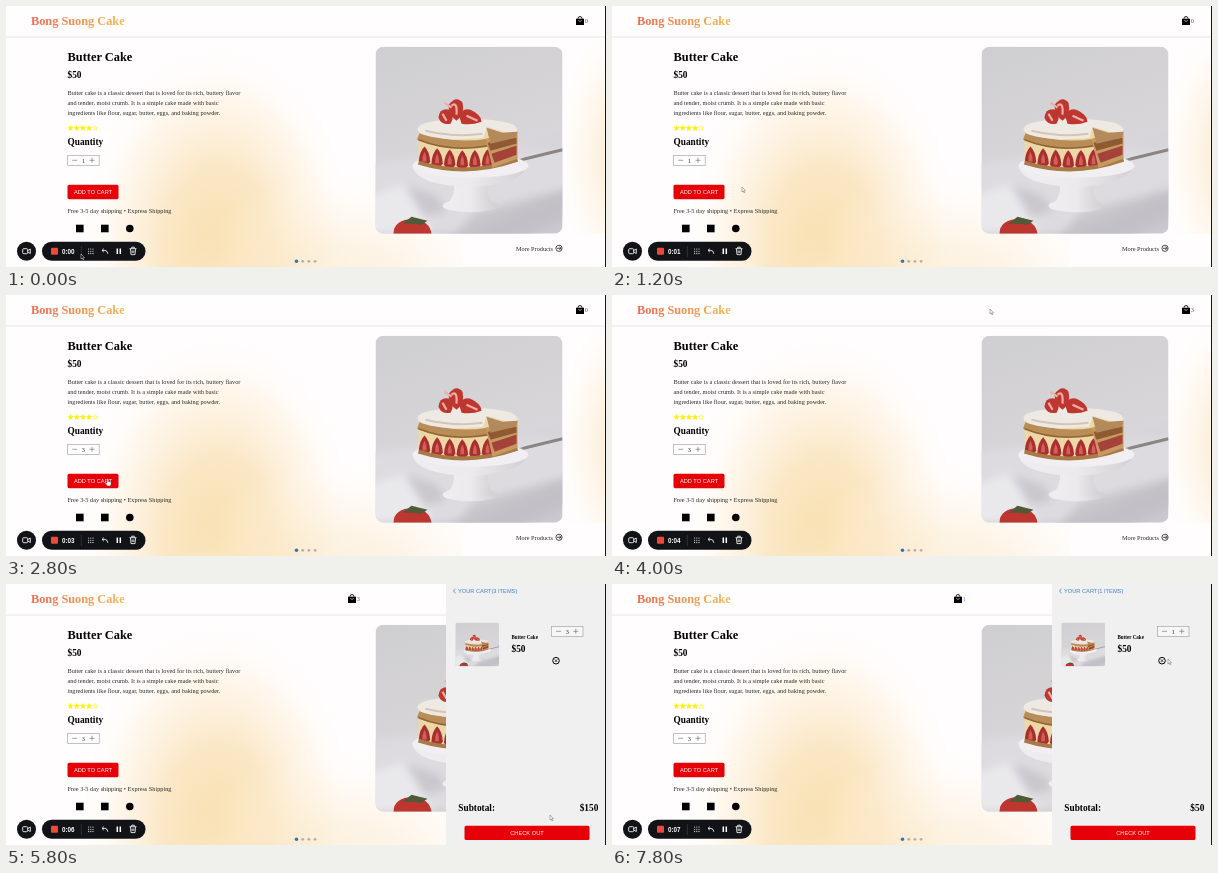
An HTML page that plays this animation: 600x261 px, repeating every 8 s.

```html
<!DOCTYPE html>
<html lang="en">
<head>
<meta charset="utf-8">
<title>Cake shop</title>
<style>
  html, body { margin: 0; width: 100%; height: 100%; overflow: hidden; background: #fffdfd; }
  svg { display: block; width: 100vw; height: 100vh; }
  text { font-family: "Liberation Serif", serif; font-size: 6.25px; fill: #2a2a2a; }
  .bold { font-weight: bold; fill: #000; }
  .title { font-size: 12.4px; }
  .sub { font-size: 9.3px; }
  .sans { font-family: "Liberation Sans", sans-serif; font-size: 5.7px; }
  .white { fill: #fff; }
  .line { fill: none; stroke: #222; stroke-width: .8; }
  .pale { fill: none; stroke: #f2f2f2; stroke-width: .9; }
</style>
</head>
<body>
<svg viewBox="0 0 600 261" preserveAspectRatio="none">
  <defs>
    <radialGradient id="glow">
      <stop offset="0" stop-color="#f9dfae"/>
      <stop offset=".4" stop-color="#fae5c0" stop-opacity=".9"/>
      <stop offset=".72" stop-color="#fef2df" stop-opacity=".6"/>
      <stop offset="1" stop-color="#fffdfd" stop-opacity="0"/>
    </radialGradient>
    <linearGradient id="brand">
      <stop offset="0" stop-color="#ee6a50"/>
      <stop offset="1" stop-color="#f0bc58"/>
    </linearGradient>
    <linearGradient id="wall" x2=".35" y2="1">
      <stop offset="0" stop-color="#cfced0"/>
      <stop offset=".55" stop-color="#d6d4d6"/>
      <stop offset=".7" stop-color="#d8d6da"/>
      <stop offset="1" stop-color="#cbc9cf"/>
    </linearGradient>
    <linearGradient id="stand">
      <stop offset="0" stop-color="#efedef"/>
      <stop offset=".5" stop-color="#eceaec"/>
      <stop offset="1" stop-color="#d2cfd3"/>
    </linearGradient>
    <clipPath id="frame"><rect width="187" height="187" rx="8"/></clipPath>
    <filter id="soft"><feGaussianBlur stdDeviation="4"/></filter>

    <g id="photo" clip-path="url(#frame)">
      <rect width="187" height="187" fill="url(#wall)"/>
      <g filter="url(#soft)">
        <path d="M-9 118L45 110L196 100V140L90 187H-9Z" fill="#dddbdf"/>
        <path d="M-9 150L34 136L58 187H-9Z" fill="#e9e8eb"/>
        <path d="M100 166L196 140V168L135 196H70Z" fill="#bfbcc3" opacity=".7"/>
        <path d="M28 137L62 150L72 164L48 170Z" fill="#bdbac1" opacity=".6"/>
      </g>
      <path d="M126 120L150 112L187 103" fill="none" stroke="#8b8585" stroke-width="3"/>
      <ellipse cx="95" cy="159" rx="28" ry="6.5" fill="url(#stand)"/>
      <path d="M77 132H114Q108 146 119 159Q95 166 71 159Q82 146 77 132Z" fill="url(#stand)"/>
      <path d="M37 120Q42 139 95 140Q148 138 153 117Z" fill="url(#stand)"/>
      <ellipse cx="95" cy="119" rx="58" ry="12" fill="#f1eff1"/>
      <path d="M43 82V116Q92 132 142 114V82Z" fill="#ecd7a6"/>
      <g id="slices"></g>
      <path d="M43 89Q75 102 113 96" fill="none" stroke="#b98d57" stroke-width="8"/>
      <path d="M43 93Q75 106 112 99" fill="none" stroke="#94652f" stroke-width="1.5"/>
      <path d="M43 116Q92 131 142 113" fill="none" stroke="#a97a48" stroke-width="4"/>
      <path d="M110 92L142 85V112L117 121Z" fill="#c79a62"/>
      <path d="M112 96L141 91V97L115 104Z" fill="#8d5a32"/>
      <path d="M116 107L141 99V108L119 116Z" fill="#a3433a"/>
      <path d="M42 82Q43 73 92 72Q141 73 142 83Q141 89 128 85L111 80L108 91Q70 95 48 88Q42 86 42 82Z" fill="#efe9e4"/>
      <path d="M50 84Q80 91 107 87" fill="none" stroke="#d4c5b8" stroke-width="2"/>
      <path d="M111 81L127 86L142 85L140 91L115 97Z" fill="#b48a5c"/>
      <g fill="#bd3730">
        <path d="M63 71Q64 61 74 63Q80 69 75 77Q66 79 63 71Z"/>
        <path d="M73 58Q81 48 87 56Q90 68 81 74Q73 68 73 58Z"/>
        <path d="M84 70Q86 61 95 63Q106 68 106 75Q96 79 86 77Z"/>
        <path d="M18 187Q18 173 38 172Q54 174 56 187Z"/>
      </g>
      <path d="M76 59Q82 54 81 68M91 69L102 74M67 67L71 74M69 56L76 61" fill="none" stroke="#efafa4" stroke-width="2.2"/>
      <path d="M27 177L36 170L52 174L46 178L37 177Z" fill="#4f5a38"/>
    </g>

    <g id="bag">
      <path d="M-4-2.3H4V4H-4Z"/>
      <path d="M-2-2.3Q-2-4.5 0-4.5T2-2.3" fill="none" stroke="#000" stroke-width=".9"/>
      <path d="M-1.8-.7Q0 1.8 1.8-.7" fill="none" stroke="#fff" stroke-width=".6"/>
    </g>
    <g id="stepper">
      <rect width="31.5" height="10" fill="#fff" fill-opacity=".35" stroke="#999" stroke-width=".6"/>
      <path d="M4.5 4.8H9.5M21.8 4.8H26.8M24.3 2.3V7.3" fill="none" stroke="#666" stroke-width=".6"/>
    </g>
  </defs>

  <rect width="600" height="261" fill="#fffdfd"/>
  <ellipse cx="212" cy="242" rx="140" ry="205" fill="url(#glow)"/>
  <ellipse cx="340" cy="290" rx="165" ry="125" fill="url(#glow)" opacity=".42"/>
  <ellipse cx="622" cy="150" rx="75" ry="140" fill="url(#glow)" opacity=".5"/>
  <rect x="457" y="228" width="143" height="33" fill="#fffdfd"/>
  <rect width="600" height="31" fill="#fffdfd"/>
  <path d="M0 31H600" stroke="#e2e0e0" stroke-width=".8"/>

  <text class="bold" x="25" y="18.7" style="font-size:12.3px;fill:url(#brand)">Bong Suong Cake</text>
  <g id="basket">
    <use href="#bag" x="574" y="15"/>
    <text id="badge" x="578.7" y="16.8"></text>
  </g>

  <text class="bold title" x="61.5" y="55">Butter Cake</text>
  <text class="bold sub" x="61.5" y="71.5">$50</text>
  <text x="61.5" y="89.3">Butter cake is a classic dessert that is loved for its rich, buttery flavor</text>
  <text x="61.5" y="99.3">and tender, moist crumb. It is a simple cake made with basic</text>
  <text x="61.5" y="109.3">ingredients like flour, sugar, butter, eggs, and baking powder.</text>
  <g id="stars" stroke="#fff000" stroke-width=".5"></g>
  <text class="bold sub" x="61.5" y="139">Quantity</text>
  <use href="#stepper" x="61.7" y="149.5"/>
  <text id="quantity" x="77.3" y="157" text-anchor="middle"></text>
  <rect x="61.5" y="178.8" width="51" height="14.4" rx="1.7" fill="#e60008"/>
  <text class="sans white" x="87" y="188" text-anchor="middle">ADD TO CART</text>
  <text x="61.5" y="207">Free 3-5 day shipping • Express Shipping</text>
  <rect x="70" y="218.7" width="7.6" height="7.6"/>
  <rect x="95" y="218.7" width="7.6" height="7.6"/>
  <circle cx="123.8" cy="222.5" r="3.8"/>

  <use href="#photo" x="369.5" y="40.7"/>
  <text x="510" y="244.7">More Products</text>
  <g class="line">
    <circle cx="553" cy="242.3" r="3.1"/>
    <path d="M551 242.3H555M553.4 240.6L555 242.3L553.4 244"/>
  </g>

  <g id="drawer">
    <rect x="440" width="160" height="261" fill="#f0f0f0"/>
    <path d="M449.5 4.7L447.5 7L449.5 9.3" fill="none" stroke="#3f7fbf" stroke-width=".8"/>
    <text id="heading" class="sans" x="452" y="9" style="fill:#3f7fbf"></text>
    <use href="#photo" transform="translate(449.3 38.6) scale(.234)"/>
    <text class="bold" x="505.5" y="54.5" style="font-size:5.05px">Butter Cake</text>
    <text class="bold sub" x="505.5" y="68">$50</text>
    <use href="#stepper" x="545.5" y="42.5"/>
    <text id="cartCount" x="561.2" y="50" text-anchor="middle"></text>
    <circle class="line" cx="550" cy="76.7" r="3.3" style="stroke:#000;stroke-width:1"/>
    <path class="line" d="M548.6 75.3L551.4 78.1M551.4 75.3L548.6 78.1"/>
    <text class="bold sub" x="452.3" y="226.5">Subtotal:</text>
    <text id="total" class="bold sub" x="592.3" y="226.5" text-anchor="end"></text>
    <rect x="458.5" y="241.7" width="125" height="14.4" rx="1.7" fill="#e60008"/>
    <text class="sans white" x="521" y="250.8" text-anchor="middle">CHECK OUT</text>
  </g>

  <g id="dots"></g>
  <circle cx="20.5" cy="245.3" r="9.5" fill="#121317"/>
  <rect class="pale" x="16.7" y="242.7" width="5" height="5" rx="1"/>
  <path d="M21.7 244.6L24.3 243V247.5L21.7 246" class="pale"/>
  <rect x="36" y="235.8" width="103.5" height="19" rx="9.5" fill="#121317"/>
  <rect x="45" y="241.8" width="7" height="7" rx="1" fill="#f0483c"/>
  <text id="timer" class="sans white" x="56" y="247.6" style="font-size:6.3px;font-weight:bold"></text>
  <path d="M75.3 240V251" stroke="#45464b" stroke-width=".6"/>
  <g id="grid" fill="#c8c8ca"></g>
  <path class="pale" d="M97.8 242.7L96 244.4L97.8 246.1M96 244.4H99Q101.7 244.7 101.8 247.8"/>
  <path d="M111.3 242.5V248M114.3 242.5V248" stroke="#fff" stroke-width="1.5"/>
  <path class="pale" d="M123.5 242.7H130.5M125.7 242.5V241.2H128.3V242.5M124.5 243L125 248.6H129L129.5 243M126.2 244.5V247M127.8 244.5V247"/>
  <rect x="599" width="1" height="261" fill="#151515"/>

  <g id="cursor" stroke-width=".45" stroke-linejoin="round">
    <path id="arrow" d="M0 0V5L1.2 4L2 5.8L2.7 5.5L1.9 3.7H3.4Z"/>
    <path id="hand" fill="#fff" stroke="#555" d="M0 .3Q.7-.6 1.3.3V2.5L3.7 3Q4.3 3.3 4 5L3.3 7H.5L-1.6 4.4Q-1.5 3.3 0 4.2Z"/>
  </g>
</svg>
<script>
const LOOP = 8000, STEP = 200;
const $ = id => document.getElementById(id);
const fill = (id, n, shape) => {
  $(id).innerHTML = Array.from({ length: n }, (_, i) => shape(i)).join("");
};

fill("stars", 5, i => {
  const points = Array.from({ length: 10 }, (_, k) => {
    const r = k % 2 ? 1.2 : 2.8, a = k * Math.PI / 5;
    return `${64.5 + 6.2 * i + r * Math.sin(a)},${122.2 - r * Math.cos(a)}`;
  }).join(" ");
  return `<polygon points="${points}" fill="${i < 4 ? "#fff000" : "none"}"/>`;
});
fill("slices", 6, i => {
  const x = 49 + i * 12.6, y = 110 + 4.5 * Math.sin((x - 43) / 99 * Math.PI);
  return `<g transform="translate(${x} ${y})">
    <path d="M0-11Q5-6 5.7 4Q4 8 0 8T-5.7 4Q-5-6 0-11Z" fill="#a92e30"/>
    <path d="M0-6Q2.5-1 2 4H-2Q-2.5-1 0-6Z" fill="#cf6159"/></g>`;
});
fill("dots", 4, i => `<circle cx="${290.5 + 6.2 * i}" cy="255.3"
  r="${i ? 1.4 : 1.8}" fill="${i ? "#b5b0aa" : "#2f73c9"}"/>`);
fill("grid", 9, i => `<circle cx="${82.6 + 2.2 * (i % 3)}"
  cy="${243.1 + 2.2 * Math.floor(i / 3)}" r=".65"/>`);

// time, x, y, pointing hand
const path = [
  [0, 75, 248, 0], [400, 77, 245, 0], [1200, 130, 181, 0],
  [1600, 86, 153, 1], [2200, 86, 153, 1], [2800, 101, 184, 1],
  [3200, 101, 184, 1], [4000, 378, 14, 0], [4800, 579, 16, 1],
  [5200, 579, 16, 1], [5800, 544, 231, 0], [6200, 546, 120, 0],
  [6600, 552, 46, 1], [7400, 552, 46, 1], [7800, 556, 75, 0], [8000, 556, 75, 0]
];

function cursorAt(t) {
  const i = path.findIndex(p => p[0] > t);
  const [t0, x0, y0, h0] = path[i - 1], [t1, x1, y1, h1] = path[i];
  const u = (t - t0) / (t1 - t0), e = u * u * (3 - 2 * u);
  return { x: x0 + (x1 - x0) * e, y: y0 + (y1 - y0) * e, hand: h0 && (h1 || !u) };
}

function draw(t) {
  const quantity = 1 + (t >= 1800) + (t >= 2200);
  const inCart = t < 3000 ? 0 : 3 - (t >= 7000) - (t >= 7400);
  const open = t >= 5200;

  $("quantity").textContent = quantity;
  $("badge").textContent = $("cartCount").textContent = inCart;
  $("badge").style.fill = inCart === 1 ? "#3f7fbf" : "#555";
  $("heading").textContent = `YOUR CART(${inCart} ITEMS)`;
  $("total").textContent = "$" + 50 * inCart;
  $("timer").textContent = "0:0" + Math.floor(.38 + .00097 * t);
  $("drawer").style.display = open ? "" : "none";
  $("basket").setAttribute("transform", `translate(${open ? -228 : 0} 0)`);

  const { x, y, hand } = cursorAt(t), onDark = y > 235;
  $("cursor").setAttribute("transform", `translate(${x} ${y})`);
  $("hand").style.display = hand ? "" : "none";
  $("arrow").style.display = hand ? "none" : "";
  $("arrow").setAttribute("fill", onDark ? "#000" : "#fff");
  $("arrow").setAttribute("stroke", onDark ? "#fff" : "#555");
}

function tick() {
  draw(Math.floor(performance.now() % LOOP / STEP) * STEP);
  requestAnimationFrame(tick);
}
tick();
</script>
</body>
</html>
```
